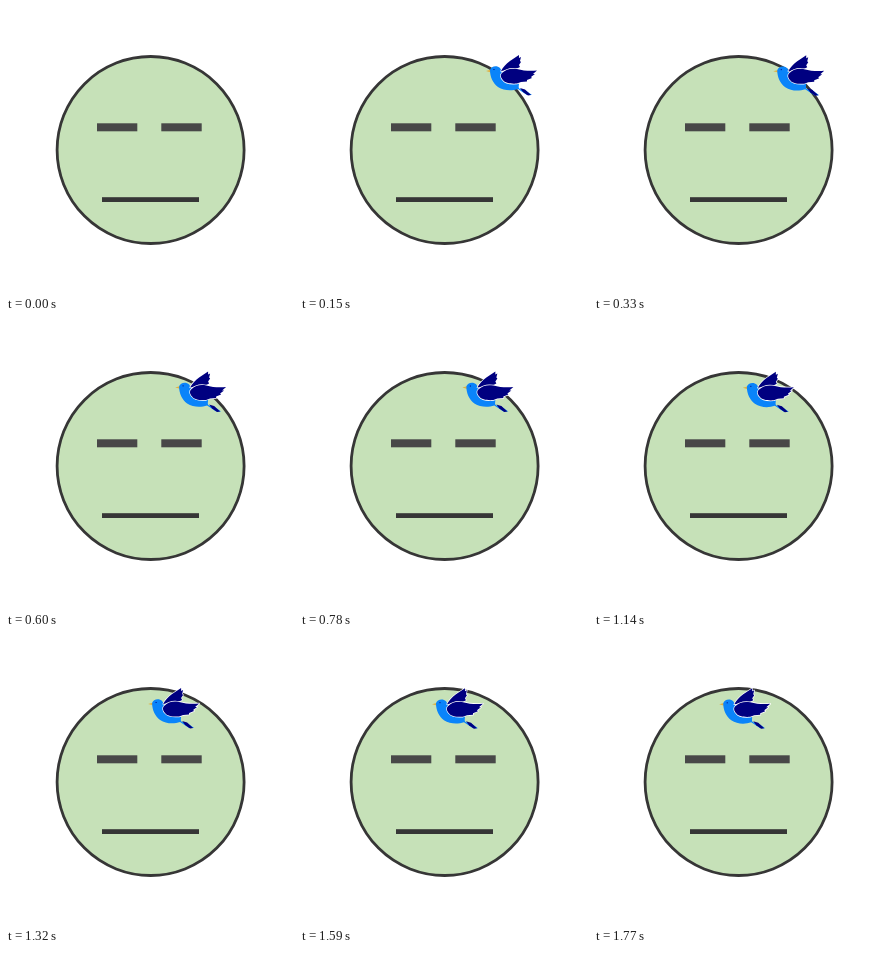
Write an HTML page with a canvas that moves like this. It is 288x288 px and loops after 1800 ms.

```html
<!DOCTYPE html>
<html lang="en">
<head>
<meta charset="utf-8">
<title>Bird passing a face</title>
<style>
html, body { margin: 0; width: 100%; height: 100%; overflow: hidden; background: #fff; }
canvas { display: block; width: 288px; height: 288px; }
</style>
</head>
<body>
<canvas id="stage" width="288" height="288"></canvas>
<script>
const ctx = document.getElementById('stage').getContext('2d');
const LOOP = 1800, STEP = 30;
const BLUE = '#0a84fa', NAVY = '#000080', INK = '#363636';

// Bird paths, relative to the tip of the beak
const body = new Path2D(
  'M4 -1 C5 -5 11 -6 14 -3 C16 0 17 3 18 6 L33 12 C33 15 32 17 34 18 ' +
  'L39 19 L46 24 L41 24 L32 18 C26 20 18 20 12 16 C7 12 4 6 4 -1 Z');
const beak = new Path2D('M0 0 L4.5 -1.2 L5 1.4 Z');
const tail = new Path2D('M34 17 L39 18.5 L45 24 L42 24.5 L37 21 Z');
const backWing = new Path2D(
  'M15 0 C17 -4 20 -7 24 -10 C27 -12 30 -14 33 -16 L33 -13 L35 -14 ' +
  'L34 -10 L35 -9 L33 -6 L34 -4 L30 -2 Z');
const frontWing = new Path2D(
  'M16 2 C20 -2 25 -3 31 -2 C38 0 45 0 51 -0.5 L47 3 L49 3 ' +
  'L45 6 L46 7 L41 9 L41 10.5 L35 11 L31 12.5 C25 13 19 12 17 9 C15 7 14 4 16 2 Z');

function bar(x, y, w, h, color) {
  ctx.fillStyle = color;
  ctx.fillRect(x, y, w, h);
}

function shape(path, color, rim) {
  if (rim) {
    ctx.strokeStyle = '#fff';
    ctx.lineWidth = rim;
    ctx.stroke(path);
  }
  ctx.fillStyle = color;
  ctx.fill(path);
}

function drawFace() {
  ctx.beginPath();
  ctx.arc(144.6, 144, 93.5, 0, Math.PI * 2);
  ctx.fillStyle = '#c6e1b8';
  ctx.fill();
  ctx.strokeStyle = INK;
  ctx.lineWidth = 2.8;
  ctx.stroke();
  bar(91, 117.3, 40.3, 8, '#484848');
  bar(155.3, 117.3, 40.4, 8, '#484848');
  bar(96, 191.2, 97, 4.8, INK);
}

function drawBird(t) {
  ctx.save();
  ctx.translate(191.6 - t * 0.0375, 64.9 + t * 0.0008);
  ctx.lineJoin = 'round';
  shape(beak, '#e0b040');
  shape(body, BLUE);
  shape(tail, NAVY);
  shape(backWing, NAVY, 1.3);
  shape(frontWing, NAVY, 1.5);
  bar(7.5, -2, 1, 1, NAVY);
  ctx.restore();
}

function draw(now) {
  const t = Math.floor((now % LOOP) / STEP) * STEP;
  ctx.fillStyle = '#fff';
  ctx.fillRect(0, 0, 288, 288);
  drawFace();
  if (t > 0) drawBird(t);
}

let start;
function tick(now) {
  if (start === undefined) start = now;
  draw(now - start);
  requestAnimationFrame(tick);
}
draw(0);
requestAnimationFrame(tick);
</script>
</body>
</html>
```
